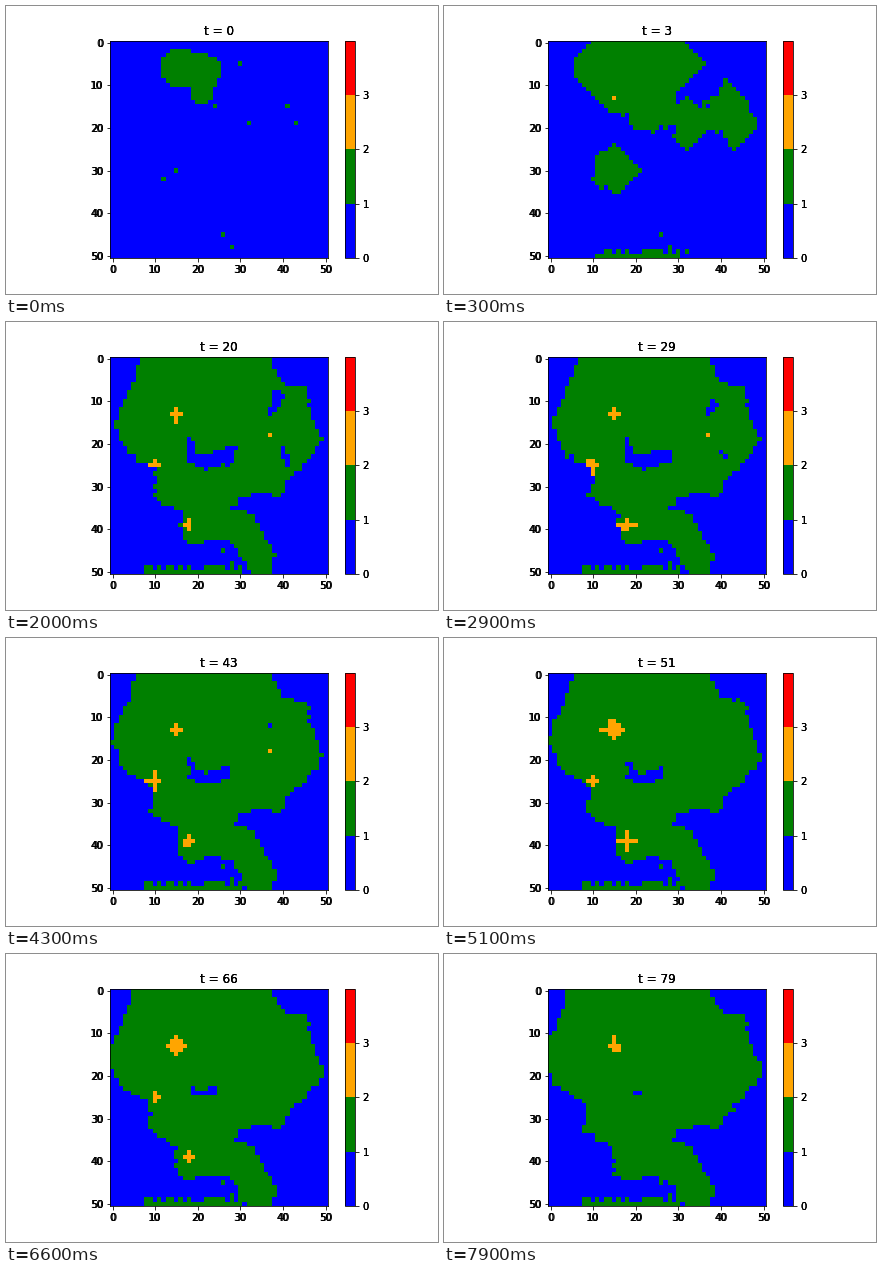
Animation, 432 px wide and 288 px high, one loop 8 s. Source, as a matplotlib script:

```python
import numpy as np
import matplotlib.pyplot as plt
from matplotlib.animation import FuncAnimation
from matplotlib.colors import ListedColormap
from matplotlib.path import Path

W, H, DPI = 432, 288, 72
N, STEPS = 51, 80
SETTLED = 11  # step at which the fast growth ends

rng = np.random.default_rng(7)
ROW, COL = np.mgrid[:N, :N]
CENTRES = np.column_stack([COL.ravel(), ROW.ravel()]) + 0.5
JITTER = rng.uniform(-0.4, 0.4, CENTRES.shape)  # ragged edges
PHASE = rng.uniform(0, 2 * np.pi, (N, N))

COAST = [(6, -2), (5, 4), (2, 11), (0, 16), (3, 23), (9, 26), (10, 29), (9, 33),
         (16, 37), (16, 43), (19, 45), (25, 43), (29, 45), (33, 52), (37, 52),
         (39, 47), (36, 43), (33, 38), (28, 36), (31, 33), (37, 32), (40, 33),
         (41, 30), (45, 26), (50, 20), (47, 12), (46, 7), (41, 6), (39, 4), (38, -2)]
LAKE = [(18, 17), (19, 18), (20, 22), (21, 24), (27, 21), (30, 20), (29, 26),
        (25, 26), (22, 27), (18, 25)]
INLET = [(38.5, 5), (43, 8), (37, 16)]
POND = [(40, 20), (43, 27), (41, 28), (40, 24)]

SEEDS = [(24, 15), (25, 5), (30, 5), (41, 15), (43, 19), (32, 19), (15, 30), (12, 32),
         (26, 45), (28, 48)]
BLOB = [(16, 6, 4.7), (21, 7, 4.3), (21, 12, 2.8)]

# Centre of each colony and its radius at the key steps
KEYS = [0, 11, 29, 43, 51, 66, 79]
COLONIES = {
    (15, 13): [-1, 2.3, 1.5, 1.3, 2.8, 2.6, 1.8],
    (10, 25): [-1, 1.2, 2, 2, 1.3, 1.3, -1],
    (18, 39): [-1, 0.5, 2, 1.7, 2, 1.4, 0],
    (37, 18): [-1, 1, 0.5, 0.5, -1, -1, -1],
    (33, 4): [-1, 0.7, -1, -1, -1, -1, -1],
}


def inside(points, centre, sx, sy=None):
    """Cells inside a polygon scaled about a centre."""
    scale = np.array([sx, sx if sy is None else sy])
    shape = Path((np.array(points) - centre) * scale + centre)
    return shape.contains_points(CENTRES + JITTER).reshape(N, N)


def shoreline(t):
    """Land that swells slowly while its waters dry up."""
    u = (t - SETTLED) / (STEPS - 1 - SETTLED)
    closing = max(0, 1 - 1.9 * u)
    land = inside(COAST, (38, 24), 0.96 + 0.07 * u)
    land &= ~inside(LAKE, (20.5, 24.5), 1 - 0.8 * u**2, 1 - 0.85 * u)
    land &= ~inside(INLET, (37.5, 13.5), closing)
    land &= ~inside(POND, (40.5, 22), closing)
    strip = (COL >= 8) & (COL <= 30)
    return land | strip & ((ROW == 50) | (ROW == 49) & (PHASE > 2))


def spread(cells):
    out = cells.copy()
    for axis in (0, 1):
        out |= np.roll(cells, 1, axis) | np.roll(cells, -1, axis)
    return out


def colonies(t):
    wobble = 0.35 * np.sin(t / 2 + PHASE)
    cells = np.zeros((N, N), bool)
    for (c, r), radii in COLONIES.items():
        cells |= abs(COL - c) + abs(ROW - r) <= np.interp(t, KEYS, radii) + wobble
    return cells


def simulate():
    land = np.zeros((N, N), bool)
    for c, r in SEEDS:
        land[r, c] = True
    for c, r, size in BLOB:
        land |= np.hypot(COL - c, ROW - r) <= size
    room = shoreline(SETTLED) | land
    for t in range(STEPS):
        if t >= SETTLED:
            land = land & room | shoreline(t)
        elif t > 0:
            land = spread(spread(land)) & room
        yield np.where(land & colonies(t), 2, land.astype(int))


grids = list(simulate())

plt.rcParams.update({"font.family": "DejaVu Sans", "font.size": 10})
fig = plt.figure(figsize=(W / DPI, H / DPI), dpi=DPI, facecolor="white")
cmap = ListedColormap(["blue", "green", "orange", "red"])
SIDE = 0.755 * H
LEFT, BOTTOM = 104.4, 0.125 * H


def panel(x, width):
    return fig.add_axes([x / W, BOTTOM / H, width / W, SIDE / H], facecolor="none")


def bare(ax):
    """Keep only the tick labels."""
    ax.spines[:].set_visible(False)
    ax.tick_params(width=0)


# Stacked labels give the text its hard, dark edges
titles = []
for shift in (0, 0.5, -0.5):
    ax = panel(LEFT + shift, SIDE)
    bar = panel(338.58, SIDE / 20)
    if shift == 0:
        image = ax.imshow(grids[0], cmap=cmap, vmin=0, vmax=4, aspect="auto",
                          interpolation="nearest")
        fig.colorbar(image, cax=bar, ticks=range(4))
    else:
        bar.set(xticks=[], ylim=(0, 4), yticks=range(4))
        bar.yaxis.tick_right()
        bare(ax)
        bare(bar)
    ax.set(xlim=(-0.5, N - 0.5), ylim=(N - 0.5, -0.5),
           xticks=range(0, N, 10), yticks=range(0, N, 10))
    titles.append(fig.text((LEFT + SIDE / 2) / W, (BOTTOM + SIDE + 6) / H, "t = 0",
                           ha="center", va="baseline", fontsize=12))


def draw(t):
    image.set_data(grids[t])
    for title in titles:
        title.set_text(f"t = {t}")
    return [image, *titles]


anim = FuncAnimation(fig, draw, frames=STEPS, interval=100, repeat=True,
                     repeat_delay=0, blit=False)
plt.show()
```
